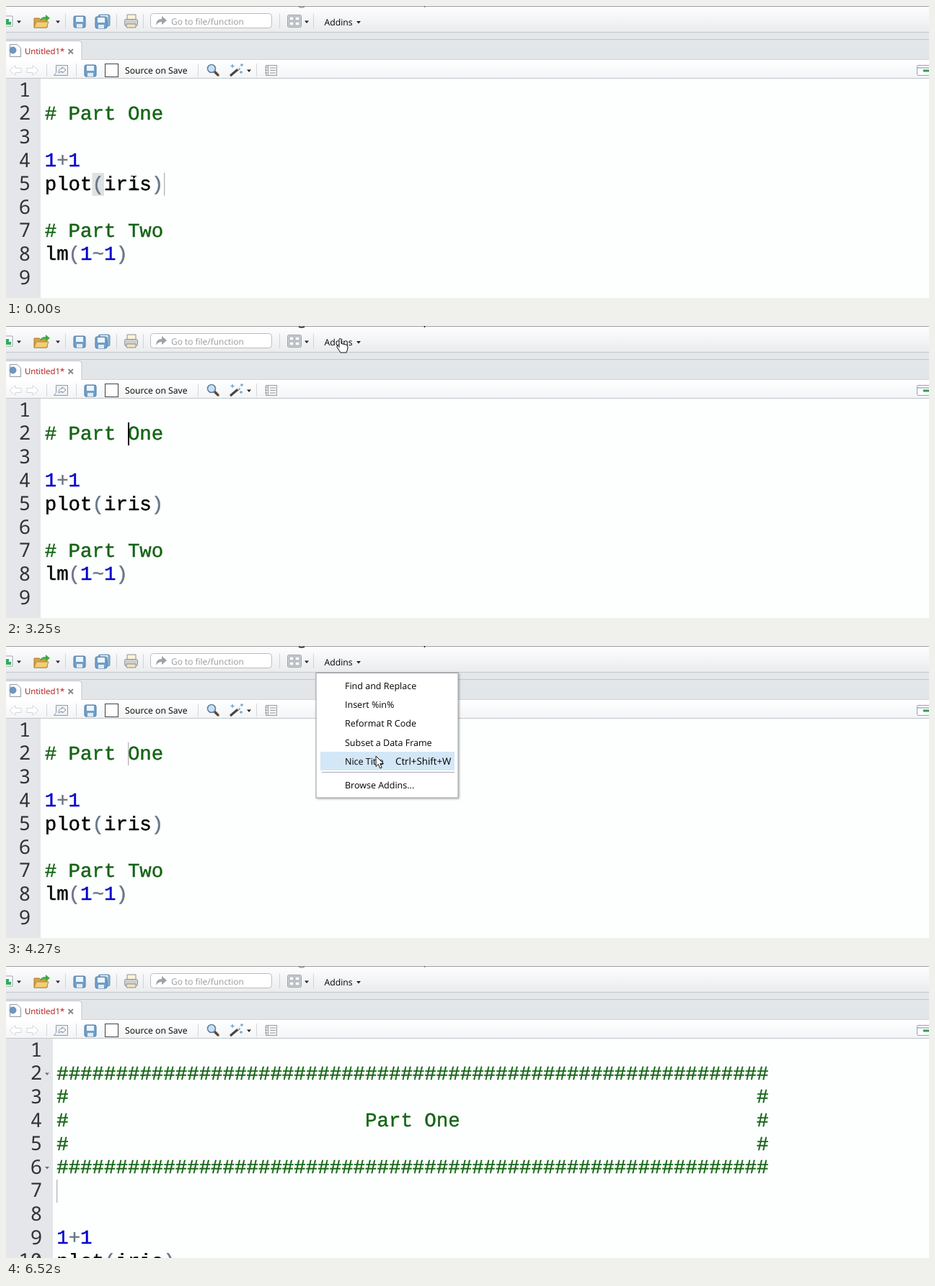
Animation, 1280 px wide and 406 px high, one loop 6620 ms. Source, as an HTML page:

```html
<!DOCTYPE html>
<html lang="en">
<head>
<meta charset="utf-8">
<title>Editor addin</title>
<style>
html, body { margin: 0; width: 100%; height: 100%; overflow: hidden; background: #fdfefe; }
svg { display: block; width: 1280px; height: 406px; }
text { font-family: "Open Sans", "Noto Sans", sans-serif; font-size: 12.2px; white-space: pre; text-rendering: geometricPrecision; }
.code text { font: 27.43px "Liberation Mono", monospace; stroke-width: .45; }
.code .num { font: 27.4px "Noto Sans Mono", monospace; text-anchor: end; fill: #333; }
#menu text { font-size: 12.5px; }
</style>
</head>
<body>
<svg viewBox="0 0 1280 406">
  <defs>
    <linearGradient id="bar" x2="0" y2="1"><stop stop-color="#fefefe"/><stop offset="1" stop-color="#e9ebed"/></linearGradient>
    <linearGradient id="bar2" x2="0" y2="1"><stop stop-color="#fff"/><stop offset="1" stop-color="#f3f4f6"/></linearGradient>
    <filter id="shadow" x="-5%" y="-5%" width="112%" height="112%"><feDropShadow dx="1" dy="1" stdDeviation="1.5" flood-opacity=".35"/></filter>
    <g id="disk">
      <rect x="-8" y="-8" width="16" height="16" rx="2" fill="#6f9fcb" stroke="#4b7aa6"/>
      <rect x="-5" y="-7" width="10" height="7" fill="#eef5fb"/>
      <rect x="-4" y="3" width="8" height="5" fill="#dfe9f2"/>
    </g>
    <path id="drop" d="M-3-1.5h6l-3 3.6z" fill="#222"/>
  </defs>

  <!-- main toolbar -->
  <rect width="1280" height="37" fill="url(#bar)"/>
  <rect width="1280" height="1" fill="#9b9ea2"/>
  <path id="marks" d="M406 1q4 2 8 0M580.5 0v2" fill="none" stroke="#222" stroke-width="1.5"/>
  <rect y="36" width="1280" height="10" fill="#e5e7ea"/>
  <path d="M0 36.5h1280M0 46.5h1280" stroke="#c3c7cb"/>
  <path d="M82.5 11v20M153.5 11v20M190.5 11v20M379.5 11v20M426.5 11v20" stroke="#d0d3d6"/>
  <path d="M-4 14h13v14H-4z" fill="#fff" stroke="#9aa3ab"/>
  <path d="M0 18h4v4h3v4H0z" fill="#2fae5d"/>
  <path d="M39 17h7l2 2h9v11H39z" fill="#d9a441" stroke="#a87b2b"/>
  <path d="M42 22h17l-3 8H39z" fill="#f2cf78" stroke="#b58a36"/>
  <path d="M47 20q2-5 8-5v-3l6 5-6 4v-3q-4 0-8 2z" fill="#43a548"/>
  <use href="#disk" x="102" y="22"/>
  <use href="#disk" x="136" y="20" opacity=".8"/>
  <use href="#disk" x="132" y="23"/>
  <g stroke="#8f8f8f">
    <path d="M168 12h12v8h-12z" fill="#fdf3d8"/>
    <rect x="164.500" y="18.500" width="18" height="9" rx="2" fill="#cfcfcf"/>
    <path d="M167 25h13v5h-13z" fill="#f3e3bd"/>
  </g>
  <rect x="200.500" y="10.500" width="168" height="20" rx="4" fill="#fff" stroke="#b9bdc1"/>
  <path d="M208 27q0-9 8-9v-4l7 6-7 6v-4q-5 0-8 5z" fill="#9da3a9"/>
  <text x="229" y="26" style="font-size:11.95px" fill="#9a9a9a">Go to file/function</text>
  <rect x="390.500" y="12.500" width="19" height="17" rx="2" fill="#c9ced3" stroke="#9ea5ab"/>
  <path d="M393 15h6v5h-6zM401 15h6v5h-6zM393 22h6v5h-6zM401 22h6v5h-6z" fill="#f7f8f9" stroke="#8e979f" stroke-width=".7"/>
  <text x="441.500" y="27">Addins</text>
  <use href="#drop" x="18" y="22"/><use href="#drop" x="72" y="22"/>
  <use href="#drop" x="417" y="22"/><use href="#drop" x="489" y="22.500"/>

  <!-- tab strip -->
  <rect y="47" width="1280" height="28" fill="#e3e6e9"/>
  <path d="M-2 76V48.500H101q4 0 4 4V76" fill="#fff" stroke="#c0c4c9"/>
  <path d="M5.500 53.500h10l5 5v12h-15z" fill="#fff" stroke="#8d99a5"/>
  <circle cx="9.500" cy="61.500" r="5" fill="#6f95bf"/>
  <text x="26" y="67" style="font-size:11.4px" fill="#b01212">Untitled1*</text>
  <path d="M86.500 60l6.500 6.500M93 60l-6.500 6.500" stroke="#8c8c8c" stroke-width="2"/>

  <!-- document toolbar -->
  <rect y="75" width="1280" height="26" fill="url(#bar2)"/>
  <path d="M0 74.500h0M105 74.500h1175" stroke="#d0d4d8"/>
  <path d="M0 100.500h1280" stroke="#c2c6ca"/>
  <path d="M56.500 80v18M97.500 80v18M266.500 80v18M347.500 80v18" stroke="#d4d7da"/>
  <path id="back" d="M5 89.500l8-7v4h8v6h-8v4z" fill="#fff" stroke="#d3d6d9"/>
  <use href="#back" transform="matrix(-1 0 0 1 50 0)"/>
  <path d="M69.500 82.500h16v14h-19l3-4z" fill="#eef1f4" stroke="#8f9ca8"/>
  <path d="M73 93q0-6 5-6v-2l5 4-5 4v-2q-3 0-5 2z" fill="#fff" stroke="#7b91a7"/>
  <use href="#disk" x="117" y="90"/>
  <rect x="137.500" y="80.500" width="18" height="18" fill="#fff" stroke="#444"/>
  <text x="165" y="94">Source on Save</text>
  <path d="M289 91l5 5" stroke="#5d4a3a" stroke-width="3.500" stroke-linecap="round"/>
  <circle cx="285" cy="87" r="5.500" fill="#c9e0f4" stroke="#63809c" stroke-width="1.600"/>
  <path d="M311 97l13-11" stroke="#444" stroke-width="3"/>
  <path d="M321 88l4-4" stroke="#eee" stroke-width="2.500"/>
  <path d="M314 81v5M311.500 83.500h5M327 80v4M325 82h4M326 90v4M324 92h4" stroke="#6fa3d8" stroke-width="1.300"/>
  <use href="#drop" x="337" y="90"/>
  <rect x="360.500" y="82.500" width="15" height="14" fill="#f4f5f6" stroke="#9aa0a6"/>
  <path d="M363.500 82v15M366 86h8M366 89.500h8M366 93h8M359 85h4M359 89h4M359 93h4" stroke="#9aa0a6"/>
  <rect x="1263.500" y="82.500" width="20" height="14" rx="1" fill="#fff" stroke="#93a3b3"/>
  <path d="M1264 86h16" stroke="#b9c6d2" stroke-width="2"/>
  <path d="M1272 90h8" stroke="#2f9e4a" stroke-width="3"/>

  <!-- editor -->
  <g class="code" id="before">
    <rect y="101" width="48" height="305" fill="#e5e6e9"/>
    <rect id="match" x="119.500" y="232" width="16.500" height="32" fill="#dfe2e2"/>
  </g>
  <g class="code" id="after">
    <rect y="101" width="65" height="305" fill="#e5e6e9"/>
    <use href="#drop" x="57" y="150" opacity=".6"/><use href="#drop" x="57" y="280.500" opacity=".6"/>
  </g>
  <rect id="caret" height="32"/>

  <g id="menu">
    <rect x="430" y="37.500" width="197" height="173.500" fill="#fff" stroke="#979ba0" filter="url(#shadow)"/>
    <rect id="hover" x="436" width="186" height="26" fill="#d3e7f6"/>
    <path d="M438 175.500h184" stroke="#a9a9a9"/>
  </g>

  <g id="pointers">
    <g id="beam"><path d="M-4-8.500h3l1 1 1-1h3M-4 8.500h3l1-1 1 1h3M0-8V8" fill="none" stroke="#222" stroke-width="1.200"/></g>
    <g id="arrow"><path d="M0 0V14.500L3.400 11.400 5.800 17 8.200 16 5.800 10.600H10.500Z" fill="#fff" stroke="#111"/></g>
    <g id="hand"><path d="M-2 1.500q0-1.500 1.500-1.500T1 1.500V7l6 1.300q3 .7 3 3.200 0 4-2 8H0L-5 12q-.6-2 1-2l2 2z" fill="#fff" stroke="#111"/></g>
  </g>
</svg>

<script>
const LOOP = 6620, ADV = 16.46, PITCH = 32.6;
const GREEN = "#146414", BLUE = "#0000cd", GREY = "#687687", BLACK = "#000";
const $ = id => document.getElementById(id);
const rowTop = n => 101.4 + PITCH * (n - 1);
const show = (el, on) => el.setAttribute("display", on ? "inline" : "none");

function set(el, attrs) {
  for (const k in attrs) el.setAttribute(k, attrs[k]);
  return el;
}

function label(parent, text, x, y, attrs = {}) {
  const el = document.createElementNS("http://www.w3.org/2000/svg", "text");
  el.textContent = text;
  parent.append(set(el, { x, y, ...attrs }));
}

// Colours a line of R and writes it token by token.
function codeLine(parent, text, x, y) {
  const tokens = text[0] === "#" ? [text] : text.match(/\d+|\w+|\W/g) || [];
  let col = 0;
  for (const tok of tokens) {
    const fill = tok[0] === "#" ? GREEN : /\d/.test(tok) ? BLUE : /\w/.test(tok) ? BLACK : GREY;
    label(parent, tok, x + col * ADV, y, { fill, stroke: fill });
    col += tok.length;
  }
}

function listing(parent, lines, numX, x) {
  lines.forEach((text, i) => {
    const y = 125.2 + PITCH * i;
    label(parent, i + 1, numX, y + .6, { class: "num" });
    codeLine(parent, text, x, y);
  });
}

const rule = "#".repeat(60);
const boxed = s => "#" + s.padStart(29 + s.length / 2).padEnd(58) + "#";
listing($("before"), ["", "# Part One", "", "1+1", "plot(iris)", "", "# Part Two", "lm(1~1)", ""], 34.3, 53.7);
listing($("after"), ["", rule, boxed(""), boxed(" ".repeat(0) + "Part One").replace(/^#\s+/, "#" + " ".repeat(25)).replace(/\s+#$/, " ".repeat(25) + "#"), boxed(""), rule, "", "", "1+1", "plot(iris)"], 50.3, 70.2);

[["Find and Replace", 60], ["Insert %in%", 86], ["Reformat R Code", 112.3], ["Subset a Data Frame", 138.5],
 ["Nice Title", 164.700], ["Browse Addins...", 198]].forEach(([s, y]) => label($("menu"), s, 470, y));
label($("menu"), "Ctrl+Shift+W", 540, 164.7, { style: "font-size:13.3px" });

// Each entry holds until the next: time, pointer, x, y
const pointerTrack = [
  [0, "beam", 177, 245], [1300, "beam", 178, 247], [1430, "beam", 180, 250], [1550, "beam", 182, 253],
  [1670, "beam", 183, 255], [1820, "beam", 178, 200], [1940, "beam", 165.5, 149],
  [2590, "beam", 215, 128], [2710, "arrow", 340, 75], [2830, "arrow", 437, 30],
  [2980, "hand", 463, 19], [3130, "hand", 464, 17.5], [3760, "arrow", 476, 36],
  [3910, "arrow", 510.5, 118], [4030, "arrow", 511, 132], [4150, "arrow", 512, 146], [4270, "arrow", 513, 153],
  [4900, "beam", 509.5, 149], [5320, "beam", 571, 175], [5470, "beam", 1042, 335], [5590, "", 0, 0]
];
// time, x, row, state (0 hidden, 1 faint, 2 solid)
const caretTrack = [
  [0, 219, 5, 1], [1430, 169, 2, 0], [2210, 169, 2, 2], [2710, 169, 2, 1], [3250, 169, 2, 2], [3760, 169, 2, 1],
  [5050, 70, 7, 2], [5590, 70, 7, 1], [6020, 70, 7, 2], [6520, 70, 7, 1]
];
// time, top of the highlighted menu row
const hoverTrack = [[0, -99], [3910, 94.5], [4030, 121], [4150, 147], [4900, -99]];
const at = (track, t) => track.findLast(e => e[0] <= t);

function draw(t) {
  const done = t >= 5050;
  show($("before"), !done);
  show($("after"), done);
  show($("match"), t < 1430);
  show($("menu"), t >= 3390 && t < 4900);
  set($("marks"), { opacity: t >= 1300 && t < 6520 ? 1 : .45 });

  const top = at(hoverTrack, t)[1];
  show($("hover"), top > 0);
  set($("hover"), { y: top });

  const [, cx, row, state] = at(caretTrack, t);
  show($("caret"), state);
  set($("caret"), { x: cx, y: rowTop(row), width: state === 2 ? 2 : 1.3, fill: state === 2 ? "#000" : "#b4b4b4" });

  const [, kind, x, y] = at(pointerTrack, t);
  for (const p of $("pointers").children) {
    show(p, p.id === kind);
    set(p, { transform: `translate(${x} ${y})` });
  }
}

const start = performance.now();
function tick() {
  draw((performance.now() - start) % LOOP);
  requestAnimationFrame(tick);
}
draw(0);
tick();
</script>
</body>
</html>
```
